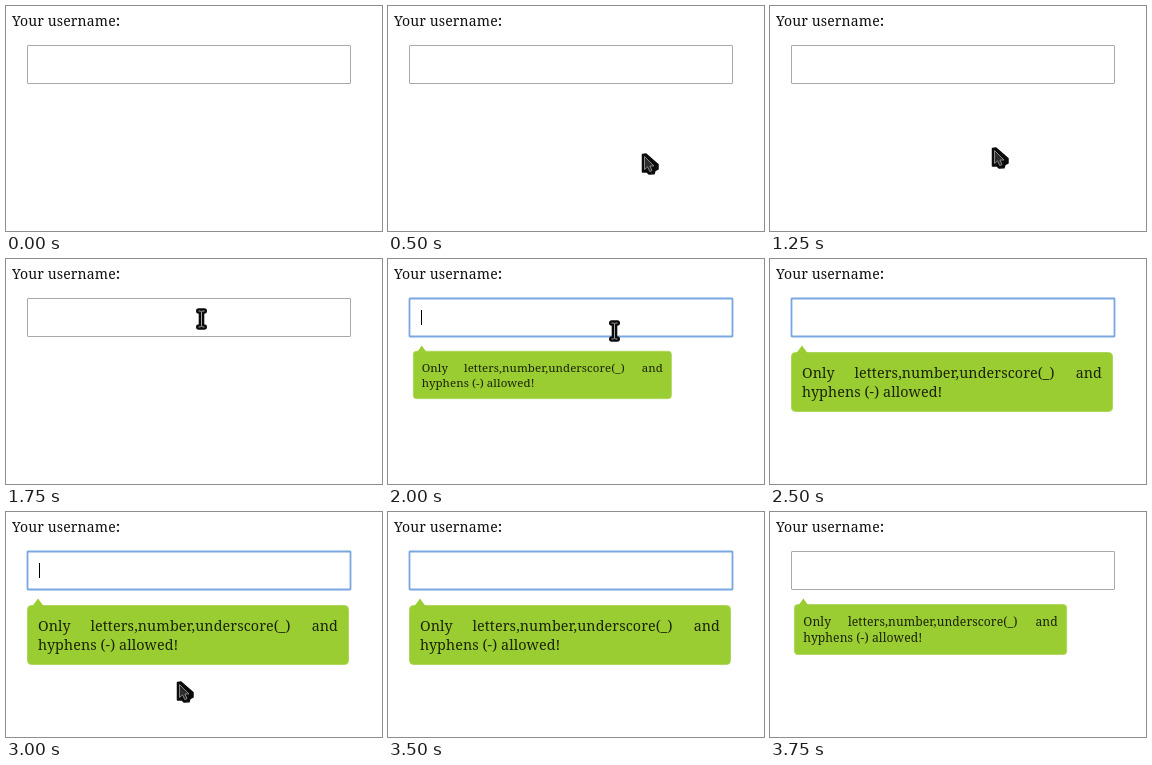
An HTML page that plays this animation: 376 by 225 pixels, repeating every 4000 ms.

```html
<!DOCTYPE html>
<html lang="zh-CN">
<head>
<meta charset="utf-8">
<style>
  html, body { margin: 0; height: 100%; overflow: hidden; background: #fff; }
  svg { display: block; }
  text { font: 14px "Noto Serif", serif; letter-spacing: .15px; fill: #111; }
  .colon { font: bold 12px "Noto Sans CJK SC", sans-serif; }
  #tip { fill: #9acd32; }
  #tip rect { stroke: #aed65c; }
  #tip text { font-size: 14.3px; letter-spacing: .1px; fill: #1c2408; }
  #field { fill: #fff; stroke: #a9a9a9; }
  #field.focus { stroke: #7ba7e0; stroke-width: 1.8; }
</style>
</head>
<body>
<svg width="376" height="225" viewBox="0 0 376 225">
  <text x="6" y="20">Your username</text>
  <text class="colon" x="109" y="20">：</text>
  <rect id="field" x="21.5" y="39.5" width="323" height="38" rx=".5"/>
  <path id="caret" d="M33.5 51V66" stroke="#000"/>
  <g id="tip">
    <rect x="21.5" y="93.5" width="321" height="59" rx="4"/>
    <path d="M26.5 94L32 86.5L37.5 94Z"/>
    <text x="32" y="119">Only</text>
    <text x="184.5" y="119" text-anchor="middle">letters,number,underscore(_)</text>
    <text x="332" y="119" text-anchor="end">and</text>
    <text x="32" y="138">hyphens (-) allowed!</text>
  </g>
  <g id="arrow" stroke-linejoin="round">
    <path d="M1.5 1.5L5 1L17 11.5V16L14 17.5L13 20.8L8 21L6 19H1.5Z" fill="#0b0b0b" stroke="#0b0b0b" stroke-width="1.5"/>
    <path d="M3.5 3.5V16.5L6.6 13.8L8.8 18.6L11 17.6L8.9 13H13Z" fill="#2c2c2c" stroke="#929292" stroke-width=".9"/>
  </g>
  <g id="beam" fill="none">
    <path d="M2.8 3H8.2M5.5 3V19M2.8 19H8.2" stroke="#0b0b0b" stroke-width="5.6" stroke-linecap="round"/>
    <path d="M2.5 3H4.5L5.5 4L6.5 3H8.5M5.5 4V18M2.5 19H4.5L5.5 18L6.5 19H8.5" stroke="#a4a4a4"/>
  </g>
</svg>
<script>
  const STEP = 250, LOOP = 4000;
  const el = id => document.getElementById(id);
  const show = (id, on) => el(id).setAttribute("visibility", on ? "visible" : "hidden");

  const arrowAt = {
    1: [255, 152], 2: [253, 147], 5: [221, 141], 6: [203, 92],
    11: [170, 185], 12: [170, 169], 13: [193, 203]
  };
  const beamAt = { 7: [190, 49], 8: [221, 61] };

  // The tip pops in past full size, settles, then starts to shrink on blur.
  const tipScale = step => ({ 8: 0.804, 9: 1.077, 15: 0.848 })[step] ?? (step > 9 ? 1 : 0);

  function place(id, pos) {
    show(id, pos);
    if (pos) el(id).setAttribute("transform", `translate(${pos})`);
  }

  function draw(now) {
    const step = Math.floor(now % LOOP / STEP);
    const focused = step >= 8 && step < 15;
    const scale = tipScale(step);
    el("field").classList.toggle("focus", focused);
    show("caret", focused && step % 4 < 2);
    show("tip", scale);
    el("tip").setAttribute("transform", `translate(41 87) scale(${scale}) translate(-41 -87)`);
    place("arrow", arrowAt[step]);
    place("beam", beamAt[step]);
  }

  const start = performance.now();
  function tick() {
    draw(performance.now() - start);
    requestAnimationFrame(tick);
  }
  tick();
</script>
</body>
</html>
```
